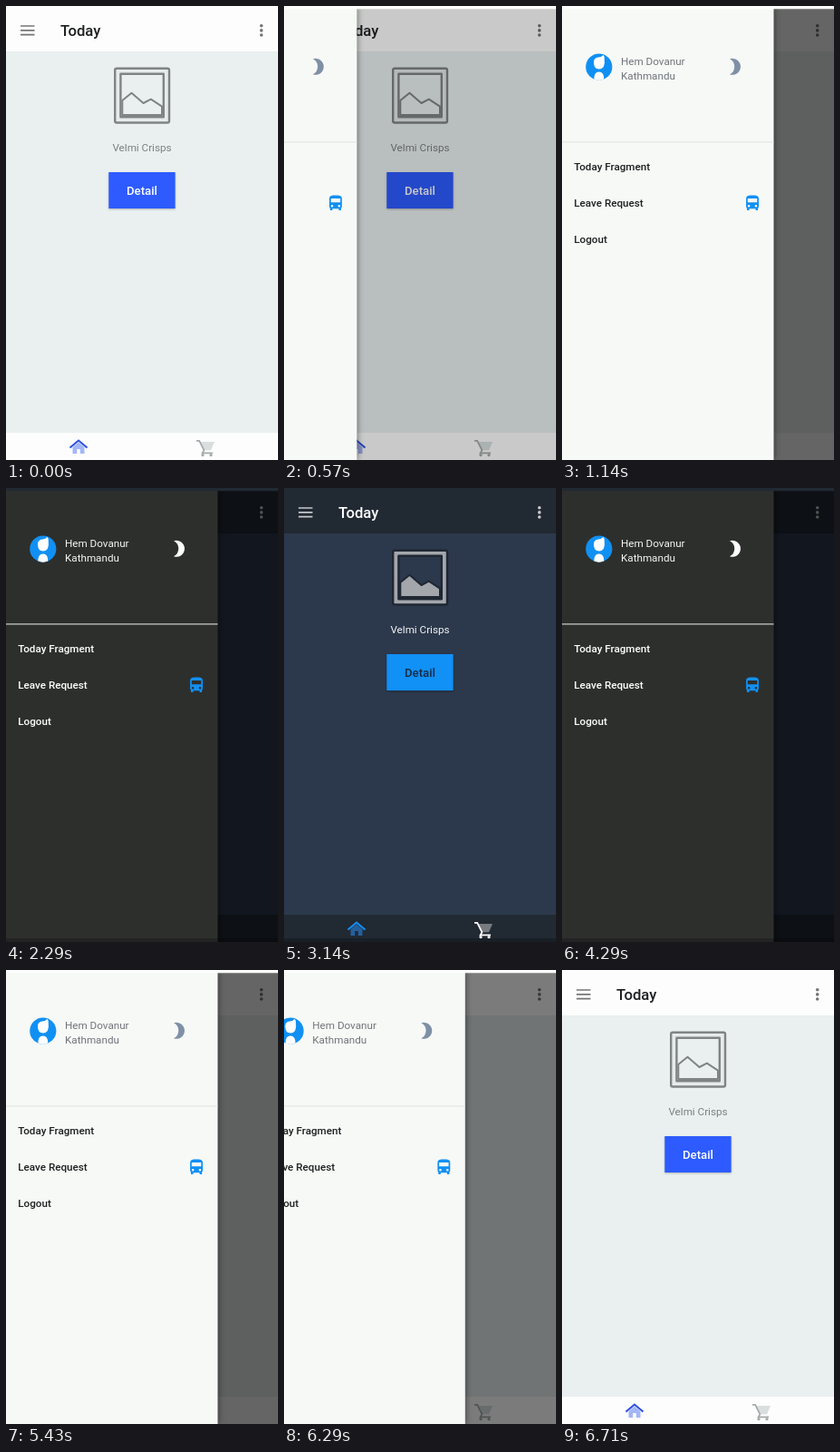
Recreate the animation shown at these times as an HTML page. Size 300 px wide and 500 px high, loop 6850 ms.

```html
<!DOCTYPE html>
<html lang="en">
<head>
<meta charset="utf-8">
<title>Drawer with day and night theme</title>
<style>
  html, body { margin: 0; width: 100%; height: 100%; overflow: hidden; }
  svg {
    display: block; width: 100vw; height: 100vh;
    font: 11.67px Roboto, sans-serif;
    --bar: #fcfdfc; --body: #e9f0ef; --title: #1d1f20; --icon: #757575; --label: #7b8082;
    --frame: #e6ebeb; --edge: #808485; --hill: #eaf0ef; --button: #2d5bff; --buttonText: #fff;
    --roof: #2f50e0; --house: #a3b6f6; --cart: #a6a9aa; --basket: #d9dfdf; --strip: 0;
    --drawer: #f7f9f7; --line: #e5e7e5; --name: #70757a; --item: #1e1f20; --moon: #7f90a6;
  }
  svg.dark {
    --bar: #212932; --body: #2c384b; --title: #fff; --icon: #c6c8cb; --label: #f4f5f6;
    --frame: #a3a6ab; --edge: #1f2733; --hill: #a3a6ab; --button: #1190f6; --buttonText: #182a40;
    --roof: #1590f5; --house: #245f9c; --cart: #fff; --basket: #777a7e; --strip: .25;
    --drawer: #2d2f2d; --line: #d0d1d0; --name: #f6f6f6; --item: #fff; --moon: #fff;
  }
  .medium { font-weight: 500; }
  .middle { text-anchor: middle; }
  .panel { fill: var(--drawer); filter: drop-shadow(1px 0 3px rgba(0, 0, 0, .4)); }
  .button { fill: var(--button); filter: drop-shadow(0 1px 1px rgba(0, 0, 0, .25)); }
</style>
</head>
<body>
<svg id="stage" viewBox="0 0 300 500">
  <rect width="300" height="500" fill="var(--body)"/>
  <rect width="300" height="50" fill="var(--bar)"/>
  <path d="M16 22h15.5M16 26.8h15.5M16 31.6h15.5" stroke="var(--icon)" stroke-width="1.7"/>
  <text class="medium" x="60" y="33" font-size="16.67" fill="var(--title)">Today</text>
  <g fill="var(--icon)">
    <circle cx="281.7" cy="21.8" r="1.8"/>
    <circle cx="281.7" cy="26.9" r="1.8"/>
    <circle cx="281.7" cy="32" r="1.8"/>
  </g>

  <g stroke="var(--edge)" stroke-width="2.4" stroke-linejoin="round">
    <rect x="120.2" y="68.7" width="59.8" height="59.8" rx="2" fill="var(--frame)"/>
    <rect x="126.4" y="74.7" width="47.4" height="47.6" fill="var(--body)"/>
    <path d="M128.3 120V104l10.2-8.3 13 11.3 8.3-4.3 12.2 8V120z" fill="var(--hill)" stroke-width="2"/>
  </g>
  <text class="middle" x="150" y="159.5" fill="var(--label)">Velmi Crisps</text>
  <rect class="button" x="113.3" y="183" width="73.3" height="40"/>
  <text class="medium middle" x="150" y="207.7" font-size="13.2" fill="var(--buttonText)">Detail</text>

  <rect y="470" width="300" height="30" fill="var(--bar)"/>
  <path d="M73.5 486l6.5-5.5 6.5 5.5v7h-4.7v-5h-3.6v5h-4.7z" fill="var(--house)"/>
  <path d="M70.5 486.5l9.5-8 9.5 8" fill="none" stroke="var(--roof)" stroke-width="2.1"/>
  <path d="M214.5 480H230l-4 9.3h-7.5z" fill="var(--basket)"/>
  <path d="M210 478.9h3.2l5.2 10.4-1.8 3H228" fill="none" stroke="var(--cart)" stroke-width="1.7"/>
  <g fill="var(--cart)">
    <circle cx="217" cy="494.6" r="1.6"/>
    <circle cx="226" cy="494.6" r="1.6"/>
  </g>

  <rect id="scrim" width="300" height="500"/>
  <g id="drawer">
    <rect class="panel" width="233.5" height="500"/>
    <circle cx="40.8" cy="67" r="14.6" fill="#1190f3"/>
    <path d="M35 62q0-5 5-5.5 3 0 5.5-2.500 2 2 1.300 5 1.200 10-5.800 10.500-6 0-6-7.500zM35.300 80.500q0-8 5.500-8t5.500 8q-5.500 2.300-11 0z" fill="#fff"/>
    <g fill="var(--name)">
      <text x="65" y="65.300">Hem Dovanur</text>
      <text x="65" y="81.200">Kathmandu</text>
    </g>
    <path d="M185 58.300a9 9 0 1 1 0 17a9.500 9.500 0 0 0 0-17z" fill="var(--moon)"/>
    <rect y="149.300" width="233.500" height="1.200" fill="var(--line)"/>
    <g class="medium" fill="var(--item)">
      <text x="13.300" y="181.300">Today Fragment</text>
      <text x="13.300" y="221.300">Leave Request</text>
      <text x="13.300" y="261.300">Logout</text>
    </g>
    <path transform="translate(199.600 206.800) scale(.87)" fill="#1190f3" fill-rule="evenodd"
      d="M4 16q0 1.300 1 2.200V20q0 1 1 1h1q1 0 1-1v-1h8v1q0 1 1 1h1q1 0 1-1v-1.800q1-.9 1-2.200V6c0-3.500-3.600-4-8-4s-8 .5-8 4zM6 15.500a1.500 1.500 0 1 1 3 0a1.500 1.500 0 1 1-3 0zM15 15.500a1.500 1.500 0 1 1 3 0a1.500 1.500 0 1 1-3 0zM6 6h12v5H6z"/>
  </g>
  <rect width="300" height="3.300" fill="var(--bar)"/>
  <rect y="496" width="300" height="4" opacity="var(--strip)"/>
</svg>
<script>
  const LOOP = 6850, STEP = 1000 / 7, SLIDE = 512, WIDTH = 233.5;
  const NIGHT = [2140, 5430];
  const moves = [[530, 1], [2735, 0], [3825, 1], [6270, 0]]; // start time, open or closed

  const [stage, scrim, drawer] = ['stage', 'scrim', 'drawer'].map(id => document.getElementById(id));

  function openness(time) {
    const move = moves.findLast(([start]) => start <= time);
    if (!move) return 0;
    const [start, target] = move;
    const left = (1 - Math.min(1, (time - start) / SLIDE)) ** 5;
    return target ? 1 - left : left;
  }

  function draw() {
    const time = performance.now() % LOOP;
    // The screen refreshes seven times a second
    const open = openness(Math.floor((time + 4) / STEP) * STEP);
    stage.classList.toggle('dark', time >= NIGHT[0] && time < NIGHT[1]);
    scrim.setAttribute('opacity', 0.6 * open);
    drawer.setAttribute('transform', `translate(${(open - 1) * WIDTH} 0)`);
    drawer.setAttribute('visibility', open > 0.001 ? 'visible' : 'hidden');
    requestAnimationFrame(draw);
  }
  draw();
</script>
</body>
</html>
```
